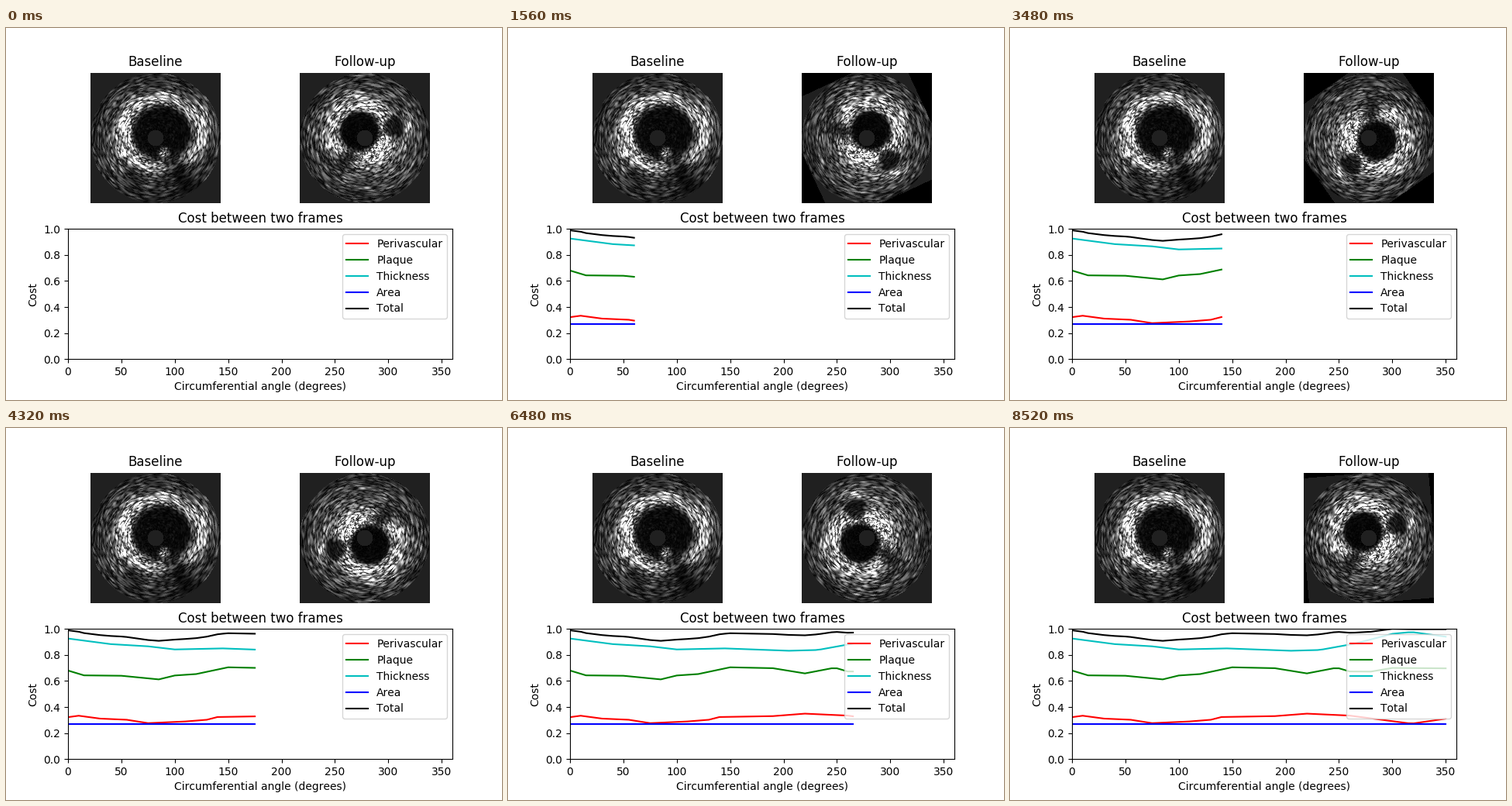
These frames come from a looping animation (640 by 480 pixels, 8.64 s). A matplotlib script:

```python
import numpy as np
import matplotlib.pyplot as plt
from matplotlib.animation import FuncAnimation

FRAMES, INTERVAL, STEP = 72, 120, 5
RADIUS = 84
BACKDROP = 0.125
ROWS, COLS = 2 * RADIUS + 2, 720

plt.rcParams["font.family"] = "DejaVu Sans"
plt.rcParams["text.kerning_factor"] = 6


def speckle(seed, radial=1.6, angular=5.5):
    """Polar ultrasound speckle: magnitude of smoothed complex noise."""
    rng = np.random.default_rng(seed)
    noise = rng.normal(size=(ROWS, COLS)) + 1j * rng.normal(size=(ROWS, COLS))
    fr = np.fft.fftfreq(ROWS)[:, None] * radial
    fa = np.fft.fftfreq(COLS)[None, :] * angular
    smooth = np.fft.ifft2(np.fft.fft2(noise) * np.exp(-2 * np.pi**2 * (fr**2 + fa**2)))
    grain = np.abs(smooth)
    return grain / grain.mean()


def blob(x, y, cx, cy, sx, sy, tilt=0):
    t = np.radians(tilt)
    u = (x - cx) * np.cos(t) + (y - cy) * np.sin(t)
    v = (y - cy) * np.cos(t) - (x - cx) * np.sin(t)
    return np.exp(-0.5 * ((u / sx) ** 2 + (v / sy) ** 2))


def rise(value, width):
    return 0.5 * (1 + np.tanh(value / width))


def baseline_tissue(x, y):
    d = np.hypot((x - 8) / 38, (y + 7) / 34)
    level = 0.22 + 0.38 * np.exp(-(((d - 1.32) / 0.25) ** 2))
    level += 0.3 * blob(x, y, -40, -8, 9, 28, 8) + 0.3 * blob(x, y, 64, -18, 8, 22, -10)
    level *= 1 - 0.93 * blob(x, y, 33, 50, 11, 32, -30)
    level *= 1 - 0.5 * blob(x, y, -32, 52, 10, 9)
    level *= 1 - 0.25 * blob(x, y, 0, 64, 34, 18)
    level *= 1 - 0.5 * blob(x, y, 3, -72, 10, 9)
    level *= rise(d - 1, 0.1)
    return level + 0.04 + 0.55 * blob(x, y, 11, 19, 4, 4)


def follow_up_tissue(x, y):
    d = np.hypot(x + 7, y + 9)
    side = np.hypot(x - 38, y + 14)
    level = 0.24 + 0.42 * np.exp(-(((d - 35) / 13) ** 2))
    level += 0.45 * blob(x, y, 55, -17, 4, 12) + 0.15 * blob(x, y, 24, 24, 14, 12)
    level *= 1 - 0.85 * blob(x, y, -24, 28, 9, 14, 35)
    level *= rise(d - 26, 3) * (0.15 + 0.85 * rise(side - 14, 3))
    return level + 0.03


def scan(tissue, grain, degrees=0):
    """Sample a scan turned clockwise about the catheter."""
    axis = np.arange(2 * RADIUS) - RADIUS + 0.5
    px, py = np.meshgrid(axis, axis)
    a = np.radians(degrees)
    x = px * np.cos(a) + py * np.sin(a)
    y = py * np.cos(a) - px * np.sin(a)
    r = np.hypot(x, y)
    row = np.minimum((2 * r).astype(int), ROWS - 1)
    col = (np.arctan2(y, x) / (2 * np.pi) * COLS).round().astype(int) % COLS
    edge_fade = 1 - 0.4 * rise(r - 74, 9)
    image = tissue(x, y) * grain[row, col] * edge_fade
    image[(r > RADIUS) | (r < 10.5)] = BACKDROP
    image[np.maximum(abs(x), abs(y)) > RADIUS] = 0
    return np.clip(image, 0, 1)


angles = np.arange(0, 360, STEP)


def curve(*key_points):
    return np.interp(angles, *np.transpose(key_points))


perivascular = curve((0, .322), (10, .333), (30, .311), (55, .302), (75, .276),
                     (110, .289), (130, .302), (140, .323), (190, .330),
                     (220, .349), (260, .334), (318, .272), (350, .310))
plaque = curve((0, .680), (15, .643), (50, .640), (85, .612), (100, .642),
               (120, .653), (150, .705), (190, .698), (220, .658),
               (248, .702), (260, .673), (280, .672), (300, .700), (350, .697))
thickness = curve((0, .926), (40, .883), (75, .866), (100, .842), (145, .850),
                  (205, .832), (232, .838), (265, .887), (300, .962),
                  (318, .976), (350, .940))
area = np.full(angles.size, 0.27)
total = 0.45 * (perivascular + plaque + thickness + area)

fig = plt.figure(figsize=(6.4, 4.8), dpi=100)


def show_scan(position, title, image):
    ax = fig.add_subplot(2, 2, position)
    ax.set_title(title)
    ax.axis("off")
    return ax.imshow(image, cmap="gray", vmin=0, vmax=1, interpolation="nearest")


follow_grain = speckle(8)
show_scan(1, "Baseline", scan(baseline_tissue, speckle(3)))
follow_up = show_scan(2, "Follow-up", scan(follow_up_tissue, follow_grain))

cost = fig.add_subplot(2, 1, 2)
cost.set(xlim=(0, 360), ylim=(0, 1), title="Cost between two frames",
         xlabel="Circumferential angle (degrees)", ylabel="Cost")
series = [("Perivascular", "r", perivascular), ("Plaque", "g", plaque),
          ("Thickness", "c", thickness), ("Area", "b", area), ("Total", "k", total)]
lines = [cost.plot([], [], color, label=name)[0] for name, color, _ in series]
cost.legend(loc="upper right")


def update(i):
    follow_up.set_data(scan(follow_up_tissue, follow_grain, STEP * i))
    for line, (_, _, values) in zip(lines, series):
        line.set_data(angles[:i], values[:i])
    return [follow_up, *lines]


anim = FuncAnimation(fig, update, frames=FRAMES, interval=INTERVAL,
                     repeat=True, repeat_delay=0)
plt.show()
```
